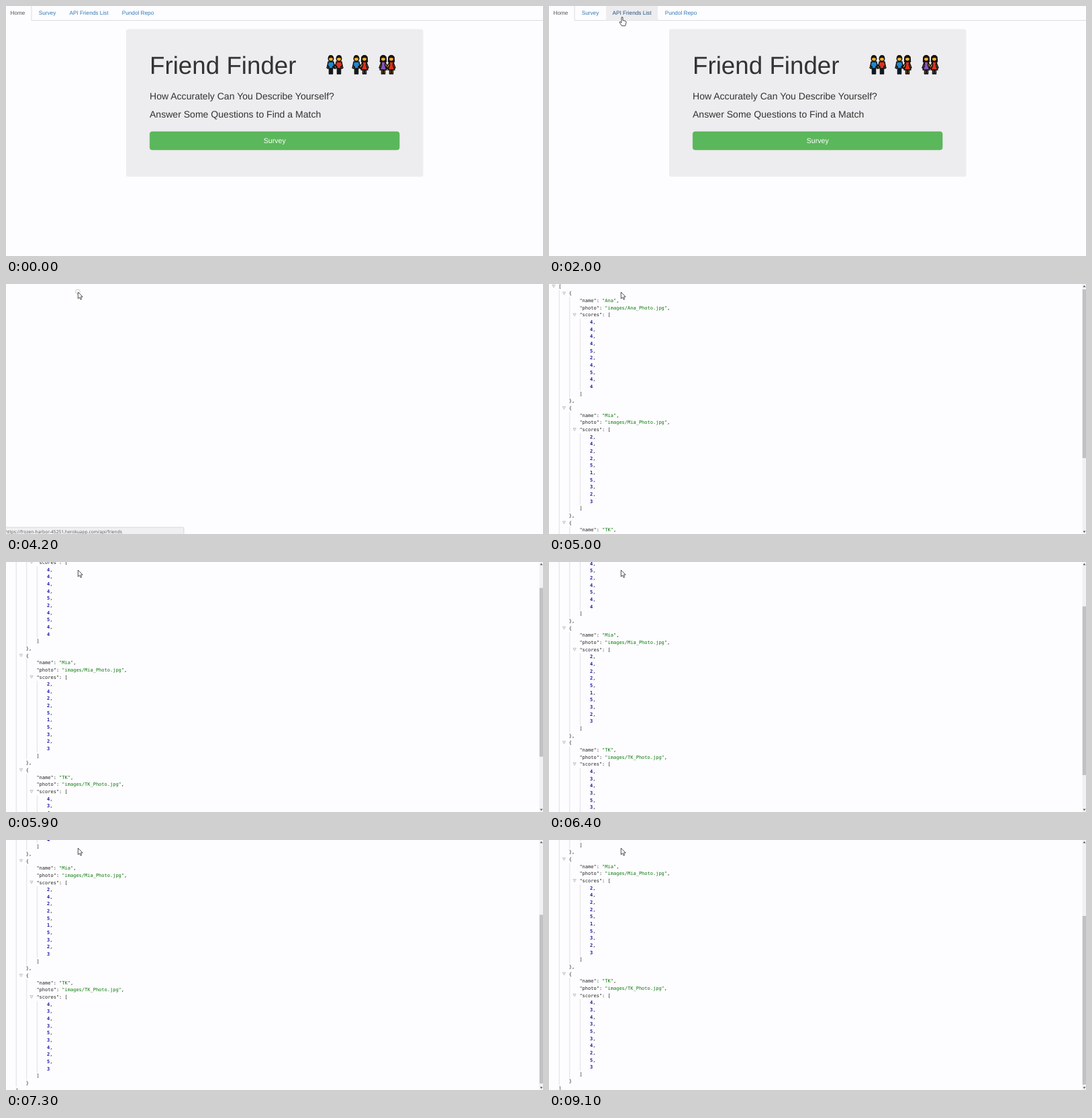
These frames come from a looping animation (800 px wide and 372 px high, 9.9 s). An HTML page:

```html
<!DOCTYPE html>
<html lang="en">
<head>
<meta charset="utf-8">
<title>Friend Finder</title>
<style>
html, body { margin: 0; width: 100%; height: 100%; overflow: hidden; background: #fdfcfe; }
svg { display: block; text-rendering: geometricPrecision; }
text { font-family: "Liberation Sans", Arial, sans-serif; white-space: pre; }
#json text { font: 7px "DejaVu Sans Mono", monospace; }
#status text { font: 6.67px "Open Sans", sans-serif; }
</style>
</head>
<body>
<svg width="800" height="372" viewBox="0 0 800 372">
  <g id="home">
    <path d="M38 0V21.5H800" fill="none" stroke="#ddd"/>
    <rect id="hover" x="85" width="77" height="21.5" fill="#edecee"/>
    <g font-size="8.23" fill="#337ab7">
      <text x="6.5" y="13" fill="#555">Home</text>
      <text x="48.7" y="13">Survey</text>
      <text id="link" x="94.5" y="13">API Friends List</text>
      <text x="172.7" y="13">Pundol Repo</text>
    </g>
    <rect x="179" y="34.5" width="442.5" height="219.5" rx="3.5" fill="#edecee"/>
    <g fill="#333">
      <text x="214" y="101.3" font-size="36.75">Friend Finder</text>
      <text x="214" y="139" font-size="14.05">How Accurately Can You Describe Yourself?</text>
      <text x="214" y="166" font-size="14.05">Answer Some Questions to Find a Match</text>
    </g>
    <rect x="214.3" y="187" width="371.7" height="27" rx="3.5" fill="#5bb75b" stroke="#4cae4c" stroke-width=".6"/>
    <text x="400.3" y="204.2" font-size="10.6" fill="#fff" text-anchor="middle">Survey</text>
    <g id="people" stroke="#111" stroke-width="1.5" stroke-linejoin="round"></g>
  </g>
  <g id="json">
    <g id="doc"></g>
    <rect x="794.5" width="5.5" height="372" fill="#f1f0f2"/>
    <rect id="thumb" x="794.8" width="5.2" height="251" fill="#c1c0c2"/>
    <path d="M795.5 4.5l2-2.5 2 2.5zM795.5 367.5l2 2.5 2-2.5z" fill="#505050"/>
  </g>
  <g id="status">
    <path d="M-1 362H263.5q1.5 0 1.5 1.5V373H-1z" fill="#f0eff1" stroke="#ccc" stroke-width=".7"/>
    <text x="-1" y="370.7" fill="#555">https://frozen-harbor-45251.herokuapp.com/api/friends</text>
  </g>
  <g id="cursor" fill="#fff" stroke="#222" stroke-width=".8" stroke-linejoin="round">
    <circle id="busy" cy="-.5" r="3.3" fill="none" stroke="#bbb"/>
    <path id="arrow" d="M.3 0V9.8l2.2-2.1 1.6 3.5 1.6-.7-1.5-3.4h3z"/>
    <path id="hand" d="M-1 1q1-1.5 2 0v4.5l4 .8q1.2.4 1 2L5.4 11 4.6 13.500H-.5L-3.600 9Q-4.500 7.400-3 7.300L-1 8.800z"/>
  </g>
</svg>
<script>
const $ = id => document.getElementById(id);
const show = (id, on) => $(id).style.display = on ? '' : 'none';

function add(parent, tag, attrs, text = '') {
  const el = document.createElementNS('http://www.w3.org/2000/svg', tag);
  for (const k in attrs) el.setAttribute(k, attrs[k]);
  el.textContent = text;
  parent.append(el);
  return el;
}

// Couples holding hands
const people = $('people');
function person(x, side, colour, woman) {
  const g = add(people, 'g', { transform: `translate(${x} 73) scale(${side} 1)` });
  const path = (d, fill) => add(g, 'path', { d, fill });
  if (woman) path('M-4 3Q0-2 4 3L4.500 10H-4.500z', '#3b2417');
  path('M-2.500 18H2.500V28H.6V21H-.6V28H-2.500z', woman ? '#f5b52e' : '#174a86');
  path('M-3 11L-6 19-4.500 20-2 15zM3 11L7 18 5.500 20 2 15z', '#f5b52e');
  path(woman ? 'M-3 10H3L2.500 15 5 22H-5L-2.500 15z' : 'M-4 10H4L5 16 3 17V20H-3V17L-5 16z', colour);
  add(g, 'circle', { cy: 5.500, r: 3.700, fill: '#f5b52e' });
  path('M-3.500 4.500Q-3 .5 0 .7T3.500 4.500Q0 2-3.500 4.500z', '#3b2417');
}
const blue = '#1d87d6', red = '#e0301e', purple = '#8657bd';
[[484, blue, 0, red, 0], [522, blue, 0, red, 1], [562, purple, 1, red, 1]].forEach(([x, a, aw, b, bw]) => {
  person(x, 1, a, aw);
  person(x + 12, -1, b, bw);
});

// JSON tree
const doc = $('doc'), rowY = i => 3.3 + 10.66 * i;
let row = 0;
function line(depth, parts, fold) {
  const x = 14.2 + 15.6 * depth, y = rowY(row++);
  const t = add(doc, 'text', { x, y: y + 2.5 });
  for (const [text, fill = '#222', weight = 400] of parts)
    add(t, 'tspan', { fill, 'font-weight': weight }, text);
  if (fold) add(doc, 'path', { d: `M${x - 9.500} ${y - 2}h4.400l-2.200 4z`, fill: '#eee', stroke: '#aaa', 'stroke-width': .6 });
}
function guide(depth, from, to) {
  const x = 15.2 + 15.6 * depth;
  add(doc, 'path', { d: `M${x} ${rowY(from) - 5}V${rowY(to) - 5}`, stroke: '#ddd', 'stroke-width': .9 });
}
const field = (key, value) => line(2, [[`"${key}": `], [`"${value}"`, '#0a7a0a'], [',']]);
const friends = [['Ana', '4444524544'], ['Mia', '2422515323'], ['TK', '4343534253']];

line(0, [['[']], true);
friends.forEach(([name, scores], i) => {
  const top = row;
  line(1, [['{']], true);
  field('name', name);
  field('photo', `images/${name}_Photo.jpg`);
  line(2, [['"scores": [']], true);
  [...scores].forEach((n, j) => line(3, [[n, '#1a1aa6', 700], [j < 9 ? ',' : '']]));
  line(2, [[']']]);
  guide(2, top + 4, row - 1);
  line(1, [[i < 2 ? '},' : '}']]);
  guide(1, top + 1, row - 1);
});
guide(0, 1, row);
line(0, [[']']]);

// Piecewise linear value through [time, value] keys
function along(keys, t) {
  if (t <= keys[0][0]) return keys[0][1];
  for (let i = 1; i < keys.length; i++) {
    const [a, u] = keys[i - 1], [b, v] = keys[i];
    if (t <= b) return u + (v - u) * (t - a) / (b - a);
  }
  return keys.at(-1)[1];
}
const cursorX = [[1300, 118], [1600, 114], [1800, 110], [2000, 109], [2200, 107]];
const cursorY = [[1300, 80], [1600, 40], [1800, 18], [2000, 16], [2200, 12]];
const scrollY = [[5500, 0], [5900, 45.5], [6800, 119], [7300, 153.5], [7500, 156]];

function draw(now) {
  const t = Math.floor(now % 9900 / 100) * 100;
  const x = along(cursorX, t), y = along(cursorY, t), scroll = along(scrollY, t);
  const home = t < 4000, over = home && t >= 1300 && y < 21;
  show('home', home);
  show('hover', over);
  $('link').setAttribute('fill', over ? '#23527c' : '#337ab7');
  show('status', t >= 2300 && t < 4500);
  show('json', t >= 4500);
  $('doc').setAttribute('transform', `translate(0 ${-scroll})`);
  $('thumb').setAttribute('y', 8 + scroll * 105 / 156);
  show('cursor', t >= 1300);
  $('cursor').setAttribute('transform', `translate(${x} ${y})`);
  show('hand', over);
  show('arrow', !over);
  show('busy', t >= 4000 && t < 5000);
  requestAnimationFrame(() => draw(performance.now()));
}
draw(performance.now());
</script>
</body>
</html>
```
